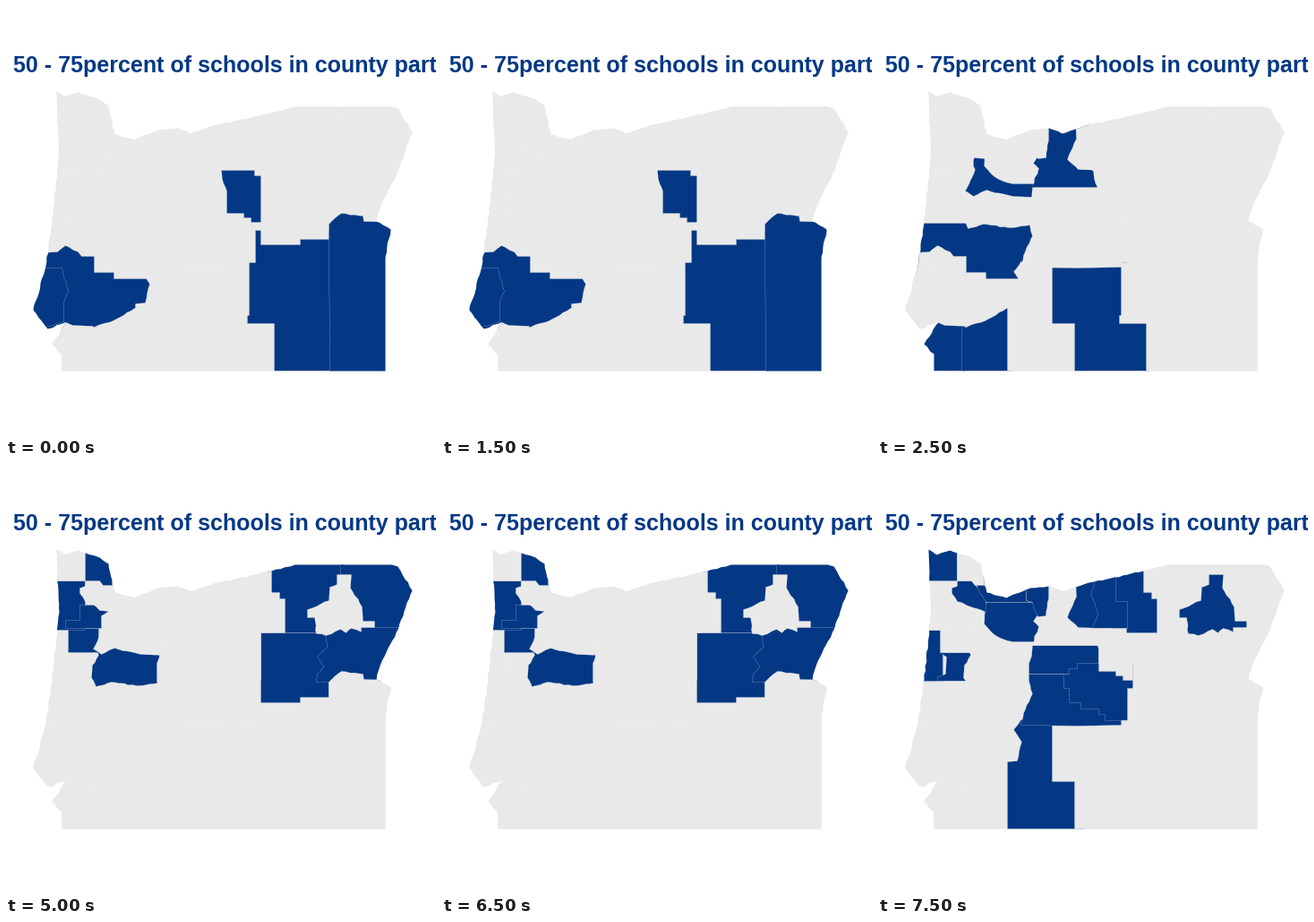
Write a matplotlib script that moves like this. It is 480x480 px and loops after 10 s.

```python
import math
import random

import matplotlib.pyplot as plt
from matplotlib.animation import FuncAnimation
from matplotlib.patches import Polygon

SIZE, DPI = 480, 100
BLUE, GRAY, SEAM = "#043884", "#e9e9e9", "#f0f0f0"
STEPS, STEP_MS = 4, 2500

fig = plt.figure(figsize=(SIZE / DPI, SIZE / DPI), dpi=DPI, facecolor="white")
ax = fig.add_axes([0, 0, 1, 1])
ax.set(xlim=(-0.5, SIZE - 0.5), ylim=(SIZE - 0.5, -0.5))
ax.axis("off")
ax.text(7.5, 73.5, "50 - 75percent of schools in county part", color=BLUE,
        family="Liberation Sans", weight="bold", size=18, va="baseline")

rng = random.Random(7)
counties = []


def corners(*coords):
    """Right-angled path: after the first point, x and y change in turn."""
    return [(a, b) if i % 2 == 0 else (b, a)
            for i, (a, b) in enumerate(zip(coords, coords[1:]))]


def box(x0, y0, x1, y1):
    return corners(x0, y0, x1, y1, x0)


def natural(points, wobble=0.7):
    """Slanted sides follow rivers and coasts, so they get a slight wobble."""
    path = []
    for (x0, y0), (x1, y1) in zip(points, points[1:] + points[:1]):
        path.append((x0, y0))
        if min(abs(x1 - x0), abs(y1 - y0)) > 1.5:
            parts = max(1, round(math.hypot(x1 - x0, y1 - y0) / 5))
            for k in range(1, parts):
                path.append((x0 + (x1 - x0) * k / parts + rng.uniform(-wobble, wobble),
                             y0 + (y1 - y0) * k / parts + rng.uniform(-wobble, wobble)))
    return path


def county(step, points):
    """Add a county that is highlighted during one step."""
    patch = Polygon(natural(points), facecolor=GRAY, edgecolor=SEAM, linewidth=0.15,
                    snap=False, zorder=2 + len(counties))
    ax.add_patch(patch)
    patch.set_clip_path(state)
    counties.append((step, patch))


state = Polygon(natural([
    (56, 95), (65, 101), (80, 96), (88, 99), (104, 104), (114, 111), (118, 134),
    (121, 143), (143, 149), (170, 138), (190, 136), (205, 142), (235, 132),
    (264, 126), (296, 119), (322, 112), (430, 112), (437, 114), (453, 141),
    (444, 164), (435, 188), (416, 228), (413, 240), (429, 249), (423, 280),
    (423, 407), (62, 407), (62, 388), (51, 377), (67, 352), (46, 360), (30, 339),
    (44, 290), (51, 240), (59, 165), (57, 120)]), facecolor=GRAY, linewidth=0, snap=False)
ax.add_patch(state)

# Painted back to front and clipped to the state: only the sides that stay
# uncovered need their true place.

# North-west
county(3, box(40, 185, 72, 243))
county(3, [(69, 210), (104, 210), (104, 242), (66, 242), (66, 237), (75, 234), (76, 215)])
county(1, box(40, 242, 176, 310))
county(2, [(100, 205), (172, 205), (169, 244), (145, 247), (117, 243), (100, 248),
           (95, 238), (96, 224), (103, 213)])
county(2, box(69, 183, 103, 210))
county(1, [(107, 169), (119, 170), (140, 190), (174, 190), (174, 213), (150, 212),
           (121, 205), (106, 212), (97, 206), (105, 190), (108, 182), (105, 177)])
county(2, box(40, 130, 88, 185))
county(2, [(82, 157), (98, 157), (104, 163), (114, 164), (106, 169), (106, 183),
           (66, 183), (66, 174), (82, 174)])
county(3, [(120, 154), (182, 154), (182, 198), (150, 198), (139, 195), (126, 187),
           (118, 178)])
county(3, [(88, 130), (104, 130), (120, 148), (120, 165), (98, 157), (88, 153),
           (82, 144), (82, 138), (88, 136)])
county(3, [(106, 125), (165, 125), (165, 152), (172, 154), (121, 154), (113, 143)])
county(3, box(40, 80, 88, 130))
county(2, [(88, 90), (125, 90), (125, 135), (108, 135), (104, 130), (88, 130)])

# South-west
county(0, [(40, 275), (57, 274), (66, 267), (80, 274), (84, 279)]
       + corners(98, 279, 98, 297, 120, 304, 170, 360, 40))
county(0, [(20, 292), (62, 292), (69, 318), (64, 331), (64, 352), (20, 365)])
county(1, [(40, 365), (60, 358), (67, 353), (74, 356), (97, 357), (97, 407), (40, 407)])
county(1, [(93, 359), (119, 351), (143, 337), (150, 337), (150, 407), (93, 407)])

# Centre
county(3, [(159, 285), (151, 296), (160, 310), (155, 331)]
       + corners(144, 332, 144, 407, 230, 285))
county(1, corners(194, 280, 302, 407, 219, 354, 194))
county(3, [(168, 234), (275, 234), (272, 291), (222, 292), (159, 291), (162, 278),
           (172, 256), (168, 242)])
county(3, [(172, 202), (246, 202), (246, 234), (168, 234), (168, 222), (171, 214)])
county(3, corners(285, 222, 222, 228, 213, 234, 207, 250, 213, 266, 226, 273, 246, 279,
                  253, 286, 285))
county(1, [(190, 125), (235, 125), (235, 182), (240, 183), (245, 202), (171, 202),
           (179, 181), (173, 175), (177, 169), (187, 168)])
county(3, [(163, 125), (190, 125), (190, 150), (187, 169), (178, 170), (172, 154),
           (165, 152)])

# East
county(0, corners(278, 250, 362, 407, 299, 354, 269, 345, 271, 286, 278))
county(2, corners(284, 188, 360, 260, 328, 266, 284))
county(2, box(290, 100, 376, 188))
county(3, corners(260, 100, 296, 143, 305, 150, 311, 188, 260))
county(3, [(220, 125), (250, 125), (250, 183), (223, 182), (211, 171), (221, 148)])
county(3, [(245, 120)] + corners(265, 120, 265, 153, 278, 183, 239)
       + [(245, 166), (237, 145)])
county(0, corners(240, 183, 277, 189, 284, 241, 273, 236, 265, 231, 246, 206) + [(241, 193)])
county(2, [(346, 180), (450, 180), (450, 243), (346, 243), (347, 234), (354, 226),
           (347, 215), (358, 204), (357, 193)])
county(0, [(360, 243), (374, 231), (398, 234), (399, 240), (440, 241), (440, 410),
           (361, 410)])
county(2, box(373, 100, 460, 182))
county(3, [(369, 123), (385, 123), (384, 138), (397, 159), (398, 175)]
       + corners(411, 175, 411, 182, 396, 187)
       + [(385, 183), (379, 188), (373, 184), (357, 191), (346, 189), (344, 171),
          (336, 171), (336, 162), (360, 152), (361, 137), (369, 134)])


def draw(frame):
    for step, patch in counties:
        patch.set_facecolor(BLUE if step == frame % STEPS else GRAY)
    return [patch for _, patch in counties]


anim = FuncAnimation(fig, draw, frames=STEPS, interval=STEP_MS, repeat=True,
                     repeat_delay=0, blit=False)
plt.show()
```
